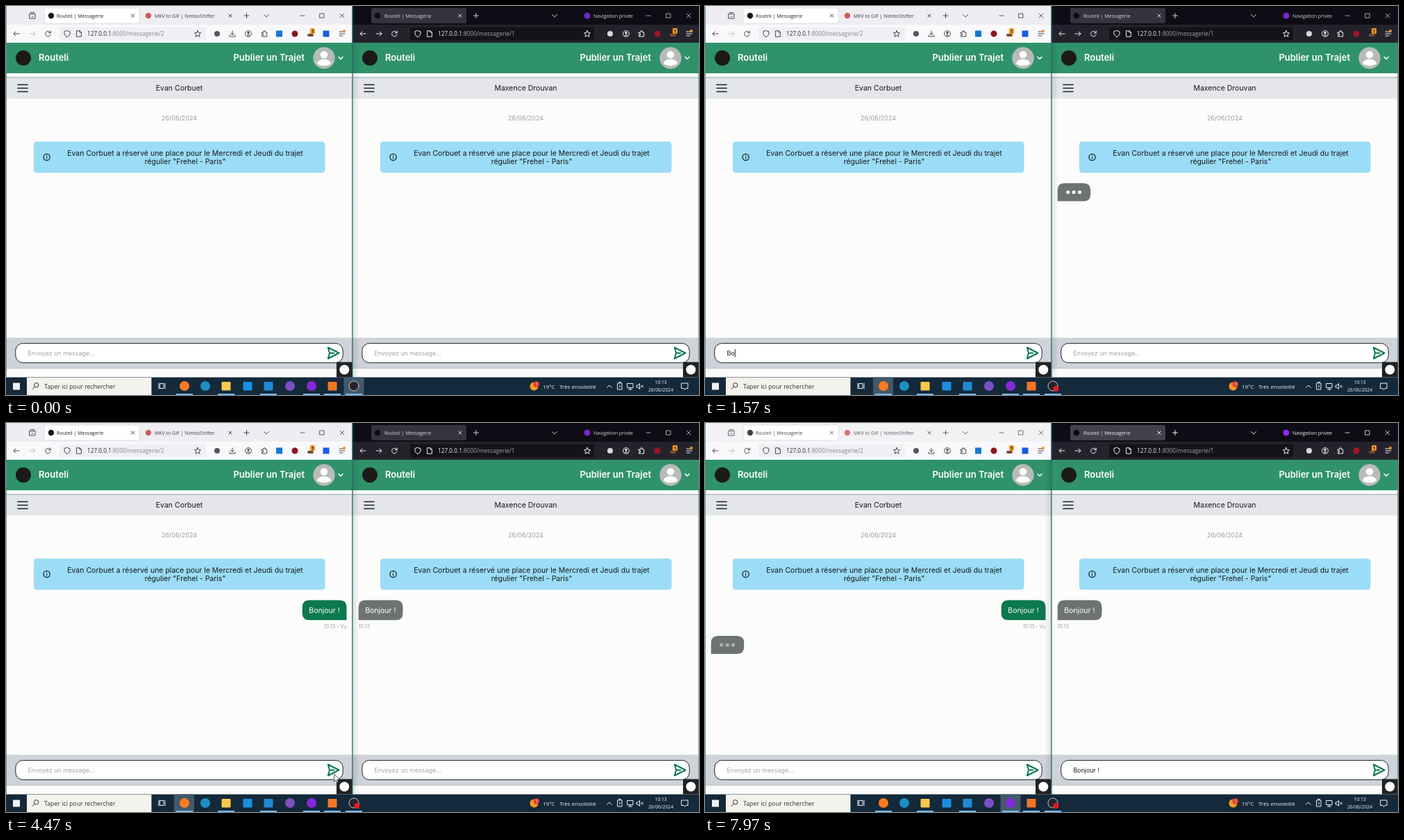
An HTML page that plays this animation: 998x561 px, repeating every 8 s.

```html
<!DOCTYPE html>
<html lang="fr">
<head>
<meta charset="utf-8">
<title>Messagerie</title>
<style>
  html, body { margin: 0; width: 100%; height: 100%; overflow: hidden; background: #fcfcfa; }
  svg { display: block; width: 100%; height: 100%; }
  text { white-space: pre; }
  .page { font-family: Inter, "Open Sans", sans-serif; font-size: 10.5px; fill: #15181b; }
  .ui { font-family: "Open Sans", "Noto Sans", sans-serif; font-size: 7px; }
  .brand { font-weight: 600; font-size: 13px; fill: #fff; }
  .mid { text-anchor: middle; }
  .end { text-anchor: end; }
  .small { font-size: 7px; fill: #9a9d9f; }
  .line { fill: none; stroke-linecap: round; stroke-linejoin: round; }
</style>
</head>
<body>
<svg id="stage" viewBox="0 0 998 561" xmlns="http://www.w3.org/2000/svg"></svg>
<script>
const LOOP = 8000;
const HALF = 499;
const MESSAGE = 'Bonjour !';
const stage = document.getElementById('stage');

const rect = (x, y, w, h, fill, extra = '') =>
  `<rect x="${x}" y="${y}" width="${w}" height="${h}" fill="${fill}" ${extra}/>`;
const dot = (x, y, r, fill, extra = '') =>
  `<circle cx="${x}" cy="${y}" r="${r}" fill="${fill}" ${extra}/>`;
const line = (d, color, width = 1, extra = '') =>
  `<path class="line" d="${d}" stroke="${color}" stroke-width="${width}" ${extra}/>`;
const text = (x, y, content, cls, extra = '') =>
  `<text x="${x}" y="${y}" class="${cls}" ${extra}>${content}</text>`;
const group = (id, content, extra = '') => `<g id="${id}" ${extra}>${content}</g>`;

// Small line icons centred on (x, y)
const icons = {
  back: 'M4 0H-4M-1 -3L-4 0L-1 3',
  forward: 'M-4 0H4M1 -3L4 0L1 3',
  reload: 'M3.4 -1.5A3.8 3.8 0 1 0 3.7 1M3.8 -4V-1.2H1',
  shield: 'M0 -4.5L4 -3V0Q3.5 3 0 4.8Q-3.5 3 -4 0V-3Z',
  page: 'M-3 -4.2H1L3.4 -2V4.2H-3ZM1 -4.2V-2H3.4',
  star: 'M0 -4.5L1.3 -1.4L4.6 -1.2L2.1 1L2.9 4.3L0 2.5L-2.9 4.3L-2.1 1L-4.6 -1.2L-1.3 -1.4Z',
  download: 'M0 -4V1.5M-2.5 -.8L0 1.6L2.5 -.8M-4 2V4H4V2',
  puzzle: 'M-3.5 -2H-1V-4H1.4V-2H3.7V4H-3.5V2H-1.5V0H-3.5Z',
  menu: 'M-4 -3H4M-4 0H4M-4 3H1',
  plus: 'M-3.5 0H3.5M0 -3.5V3.5',
  cross: 'M-2.2 -2.2L2.2 2.2M2.2 -2.2L-2.2 2.2',
  close: 'M-3 -3L3 3M3 -3L-3 3',
  minimise: 'M-3 0H3',
  maximise: 'M-3 -3H3V3H-3Z',
  down: 'M-3.5 -1.5L0 1.8L3.5 -1.5',
  up: 'M-3.5 1.8L0 -1.5L3.5 1.8',
  box: 'M-4 -2.5H4V4H-4ZM-3 -4.5H3M-1 1L1 1'
};
const icon = (name, x, y, color, width = 1) =>
  line(icons[name], color, width, `transform="translate(${x} ${y})"`);

function account(x, color) {
  return dot(x, 40, 4.4, 'none', `stroke="${color}"`) + dot(x, 38.7, 1.7, color) +
    `<path d="M${x - 2.8} 42.8Q${x} 39.6 ${x + 2.8} 42.8Z" fill="${color}"/>`;
}

function badge(x) {
  return rect(x - 5, 40, 9, 4, '#7b4a35', 'rx="2"') +
    rect(x - 1, 32, 7, 8, '#f39a1e', 'rx="1.5"') +
    text(x + 2.5, 38.5, '1', 'ui mid', 'font-weight="700" style="font-size:6.5px" fill="#222"');
}

function windowButtons(xs, color) {
  return ['minimise', 'maximise', 'close'].map((name, i) => icon(name, xs[i], 14, color, .8)).join('');
}

function navigation(dx, shieldX, color, forward) {
  return icon('back', dx + 15, 40, color) + icon('forward', dx + 38, 40, forward) +
    icon('reload', dx + 60.5, 40, color) + icon('shield', shieldX, 40, color) +
    icon('page', shieldX + 17, 40, color);
}

const address = (x, page, strong, weak) => text(x, 43.3,
  `<tspan fill="${strong}">127.0.0.1</tspan><tspan fill="${weak}">:8000/messagerie/${page}</tspan>`,
  'ui', 'style="font-size:8.25px"');

function lightChrome() {
  const ink = '#45454e';
  return rect(0, 0, HALF, 27, '#eeeef2', 'id="lightStrip"') + rect(0, 27, HALF, 26, '#f9f9fb') +
    rect(55, 3, 137, 22, '#fff', 'rx="2.5" stroke="#d6d6dc" stroke-width=".7"') +
    group('lightTabs',
      icon('box', 38, 14, ink) + dot(65, 14, 4.2, '#15151a') +
      text(73, 16.7, 'Routeli | Messagerie', 'ui', 'fill="#25252c"') +
      icon('cross', 182.5, 14, ink) + dot(205, 14, 4.2, '#cf5b58') +
      text(214, 16.7, 'MKV to GIF | NimboShifter', 'ui', 'fill="#3b3b44"') +
      icon('cross', 323, 14, ink) + icon('plus', 346.5, 14, ink) + icon('down', 375, 14, ink) +
      windowButtons([427, 455, 484], '#33333a')) +
    rect(77, 30.5, 211, 19, '#f0f0f4', 'rx="2.5"') +
    navigation(0, 88, ink, '#bdbdc3') + address(117, 2, '#25252c', '#85858d') +
    icon('star', 276, 40, ink) + dot(304, 40, 4, '#55555e') + icon('download', 326, 40, ink) +
    account(349, ink) + icon('puzzle', 372, 40, ink) +
    rect(389, 35.5, 9, 9, '#1677d2') + dot(416, 40, 4.5, '#8c1522') + badge(439) +
    rect(456.5, 35.5, 9, 9, '#175ddc') + icon('menu', 484, 40, ink) +
    dot(487, 36, 2, '#f39a1e');
}

function darkChrome() {
  const ink = '#f0f0f4';
  return rect(HALF, 0, HALF, 27, '#0e0d15') + rect(HALF, 27, HALF, 26, '#24232c') +
    rect(526, 3, 137, 22, '#35343e', 'id="darkTab" rx="2.5"') +
    group('darkTabs',
      dot(535, 14, 4.2, '#07070a') + text(545, 16.7, 'Routeli | Messagerie', 'ui', `fill="${ink}"`) +
      icon('cross', 654, 14, ink) + icon('plus', 677, 14, ink) + icon('down', 790, 14, ink) +
      dot(837, 14, 4.5, '#8a2be2') + text(846, 16.7, 'Navigation privée', 'ui', `fill="${ink}"`) +
      windowButtons([925, 954, 983], ink)) +
    rect(582, 30.5, 265, 19, '#14131a', 'rx="2.5"') +
    navigation(HALF, 593, ink, ink) + address(622, 1, ink, '#a3a2ab') +
    icon('star', 837, 40, ink) + dot(870, 40, 4, '#d8d8de') + account(893, ink) +
    icon('puzzle', 915, 40, ink) + dot(938, 40, 4.5, '#a01424') + badge(961) +
    icon('menu', 984, 40, ink) + dot(987, 36, 2, '#f39a1e');
}

function pane(side, dx, contact) {
  const content =
    rect(0, 53, HALF, 482, '#fcfcfa') + rect(0, 53, HALF, 44, '#2f926b') +
    dot(25, 75, 11, '#1c1a18') +
    text(47, 79.3, 'Routeli', 'page brand') + text(430, 79.3, 'Publier un Trajet', 'page brand end') +
    dot(458, 75, 15.7, '#b9bbba') + dot(458, 70.2, 5.3, '#fff') +
    '<path d="M448 83.5Q449 76.8 458 76.8Q467 76.8 468 83.5Q458 89 448 83.5Z" fill="#fff"/>' +
    line('M479 73.5L482 76.5L485 73.5', '#fff', 1.6) +
    rect(0, 103, HALF, 30.5, '#e4e6ea') + rect(0, 102.5, HALF, 1, '#93a6b0') +
    line('M17 113.5H31M17 118.5H31M17 123.5H31', '#17202a', 1.7) +
    text(249.5, 122.2, contact, 'page mid') +
    text(249.5, 165.2, '26/06/2024', 'page mid', 'style="font-size:9px;fill:#9b9da0"') +
    rect(40, 195.5, 419.5, 45, '#9bdcf6', 'rx="4.5"') +
    dot(58.6, 218, 4.6, 'none', 'stroke="#17202a" stroke-width="1.3"') +
    rect(58, 217.4, 1.2, 3, '#17202a') + rect(58, 215.3, 1.2, 1.2, '#17202a') +
    text(258, 215.8, 'Evan Corbuet a réservé une place pour le Mercredi et Jeudi du trajet', 'page mid') +
    text(258, 228.3, 'régulier "Frehel - Paris"', 'page mid') +
    rect(0, 478.5, HALF, 44, '#cdd3d8') + rect(0, 522, HALF, .8, '#b3bcc3') +
    rect(13.8, 486.5, 471.4, 28, '#fff', 'rx="10.5" stroke="#20262c" stroke-width="1"') +
    text(31.5, 503.8, '', 'page', `id="${side}Input" style="font-size:8.9px"`) +
    rect(31.3, 495, .9, 11.5, '#111', `id="${side}Caret"`) +
    line('M463.8 492.5L479.5 500.5L463.8 508.5L466 500.5ZM466 500.5H472.5', '#08784f', 2) +
    rect(476, 513.5, 23, 22, '#202124') + dot(487.3, 524.5, 7, '#fff');
  return group(side + 'Pane', content, `transform="translate(${dx} 0)"`);
}

// Speech bubble with one square bottom corner
function bubble(x, y, w, h, fill, squareRight) {
  const r = 10, right = x + w, bottom = y + h;
  const foot = squareRight
    ? `V${bottom}H${x + r}Q${x} ${bottom} ${x} ${bottom - r}`
    : `V${bottom - r}Q${right} ${bottom} ${right - r} ${bottom}H${x}`;
  return `<path fill="${fill}" d="M${x} ${y + r}Q${x} ${y} ${x + r} ${y}H${right - r}Q${right} ${y} ${right} ${y + r}${foot}Z"/>`;
}

const typing = (id, x, y) => group(id, bubble(x, y, 47.5, 26, '#6d7370', false) +
  [15, 23.4, 31.8].map(d => dot(x + d, y + 13, 2.6, '#fdfbef')).join(''));

function messages() {
  const label = 'style="fill:#fff"';
  return group('sent', bubble(426.7, 255.5, 63.8, 28.8, '#0b784f', true) +
      text(458.5, 273.8, MESSAGE, 'page mid', label) +
      text(490.5, 296, '', 'page small end', 'id="status"')) +
    group('received', bubble(507.7, 255.5, 63.8, 28.8, '#6d7370', false) +
      text(539.3, 273.8, MESSAGE, 'page mid', label) + text(507.7, 296, '10:13', 'page small')) +
    typing('rightTyping', 507.7, 255.5) + typing('leftTyping', 8.7, 307);
}

function taskbar() {
  const white = '#eef2f4';
  const apps = [[257, '#ff7a1f'], [287, '#1b8fc4'], [317, '#f6c94c'], [348, '#1b8de0'], [378, '#1f8ad2'],
    [409, '#7b4fc0'], [440, '#8429d8'], [470, '#f37623'], [501, '#25242a']];
  const square = [317, 348, 378, 470];
  const closed = [287, 348, 409];
  const marks = apps.map(([x, color]) =>
    (closed.includes(x) ? '' : rect(x - 12, 559, 24, 2, '#76b9ed')) +
    (square.includes(x) ? rect(x - 6.5, 542, 13, 12.5, color, 'rx="1"')
      : dot(x, 548, 7, color, x === 501 ? 'stroke="#c9cbd0" stroke-width="1"' : ''))).join('');
  return rect(0, 535.5, 998, 25.5, '#14293a') + rect(10, 543.5, 10, 10, white) +
    rect(30, 536, 179.5, 25, '#f3f2ed') +
    dot(43.7, 546.8, 3.2, 'none', 'stroke="#2a2a2a"') + line('M41.3 549.2L38 552.5', '#2a2a2a') +
    text(55, 552, 'Taper ici pour rechercher', 'ui', 'style="font-size:8.8px" fill="#303030"') +
    line('M220 544V552M222 544.5H227V551.5H222ZM229 544V552', white) +
    rect(242, 535.5, 29, 25.5, '#41596a', 'id="activeApp"') + marks +
    group('recording', dot(505.5, 552, 4, '#e31b23')) +
    dot(760.5, 548.5, 6, '#f59a23') + dot(764, 545.5, 4.3, '#d83b35') +
    text(764, 548, '1', 'ui mid', 'fill="#fff"') +
    text(773, 551.6, '19°C', 'ui', `style="font-size:8px" fill="${white}"`) +
    text(797, 551.6, 'Très ensoleillé', 'ui', `style="font-size:8px" fill="${white}"`) +
    icon('up', 869, 548.5, white) +
    line('M881 544H887V553H881ZM882.5 542.5H885.5M884 547V550', white) +
    line('M895 544.5H903V550.5H895ZM899 550.5V553M896.5 553H901.5', white) +
    line('M908.5 547H910L912.5 544.5V552.5L910 550H908.5ZM914.5 547L917.5 550M917.5 547L914.5 550', white) +
    text(943, 545, '10:13', 'ui mid', `style="font-size:6.8px" fill="${white}"`) +
    text(943, 556, '26/06/2024', 'ui mid', `style="font-size:6.8px" fill="${white}"`) +
    line('M973 544H982V551.5H979L977.5 553.5L976 551.5H973Z', white);
}

stage.innerHTML = `<defs>
    <linearGradient id="shade"><stop stop-color="#000" stop-opacity=".1"/><stop offset="1" stop-opacity="0"/></linearGradient>
  </defs>` +
  pane('left', 0, 'Evan Corbuet') + pane('right', HALF, 'Maxence Drouvan') +
  lightChrome() + darkChrome() + messages() +
  rect(500, 53, 9, 482, 'url(#shade)', 'id="rightShade"') +
  rect(489, 53, 9, 482, 'url(#shade)', 'id="leftShade" transform="rotate(180 493.5 294)"') +
  rect(0, 0, .8, 535, '#4d8190') + rect(498.2, 0, 1.4, 535, '#2b6676') + rect(997.3, 53, .7, 482, '#4d8190') +
  taskbar() +
  group('mouse', line('M-2 -5.5Q0 -5.5 0 -4V4Q0 5.5 -2 5.5M2 -5.5Q0 -5.5 0 -4M0 4Q0 5.5 2 5.5', '#111', 1, 'id="beam"') +
    '<path id="arrow" d="M0 0V11L2.6 8.6L4.4 12.4L6 11.6L4.3 8H7.6Z" fill="#fff" stroke="#111" stroke-width=".7"/>');

const el = id => document.getElementById(id);
const show = (id, on) => el(id).setAttribute('visibility', on ? 'visible' : 'hidden');
const clamp = v => Math.min(1, Math.max(0, v));
const ease = v => v * v * (3 - 2 * v);

const left = { side: 'left', focus: 800, blur: 4600, sent: 2700,
  keys: [1350, 1500, 1680, 1800, 1930, 2060, 2190, 2350, 2480] };
const right = { side: 'right', focus: 4650, blur: LOOP, sent: Infinity,
  keys: [5480, 5750, 6050, 6350, 6600, 6800, 6950, 7100, 7250] };
const RECEIVED = 3950;

function drawInput({ side, focus, blur, sent, keys }, t) {
  const typed = t < sent ? keys.filter(k => k <= t).length : 0;
  const field = el(side + 'Input');
  field.textContent = typed ? MESSAGE.slice(0, typed) : 'Envoyez un message...';
  field.style.fill = typed ? '#15181b' : '#a0a3a6';
  const last = t >= sent ? sent : typed ? keys[typed - 1] : focus;
  el(side + 'Caret').setAttribute('x', 31.3 + (typed ? field.getComputedTextLength() + .4 : 0));
  show(side + 'Caret', t >= focus && t < blur && (t - last) % 1060 < 530);
}

// Dots dim one after another, then brighten again, once a second
function drawTyping(id, t, start, end) {
  show(id, t >= start && t < end);
  const phase = Math.max(0, t - start) % 1000;
  el(id).querySelectorAll('circle').forEach((c, i) => {
    const p = phase - i * 110;
    const dim = clamp((p - 150) / 80) - clamp((p - 600) / 120);
    c.setAttribute('opacity', 1 - .55 * dim);
  });
}

function drawMouse(t) {
  const first = t < 3000;
  const k = ease(clamp(first ? (t - 250) / 500 : (t - 4250) / 350));
  const [x0, y0, x1, y1] = first ? [500, 548, 294, 498] : [294, 498, 552, 510];
  const x = x0 + (x1 - x0) * k, y = y0 + (y1 - y0) * k;
  const visible = (t >= 250 && t < 1350) || (t >= 4250 && t < 5480);
  const overField = y < 515 && (x < 460 || x > 512);
  el('mouse').setAttribute('transform', `translate(${x} ${y})`);
  show('beam', visible && overField);
  show('arrow', visible && !overField);
}

function draw(t) {
  const leftActive = t >= left.focus && t < left.blur;
  const rightActive = t >= left.blur;
  drawInput(left, t);
  drawInput(right, t);
  show('sent', t >= left.sent);
  el('status').textContent = t < RECEIVED ? 'Envoi...' : '10:13 - Vu';
  show('received', t >= RECEIVED);
  drawTyping('rightTyping', t, 1430, RECEIVED);
  drawTyping('leftTyping', t, 5500, LOOP);
  drawMouse(t);

  el('lightTabs').setAttribute('opacity', rightActive ? .82 : 1);
  el('darkTabs').setAttribute('opacity', rightActive ? 1 : .85);
  el('lightStrip').setAttribute('fill', rightActive ? '#f2f2f5' : '#eeeef2');
  el('darkTab').setAttribute('fill', rightActive ? '#42414d' : '#35343e');
  show('rightShade', !rightActive);
  show('leftShade', rightActive);
  el('activeApp').setAttribute('x', leftActive ? 242 : rightActive ? 425.5 : 486.5);
  show('recording', t >= 400);
}

function tick() {
  draw(performance.now() % LOOP);
  requestAnimationFrame(tick);
}
tick();
</script>
</body>
</html>
```
